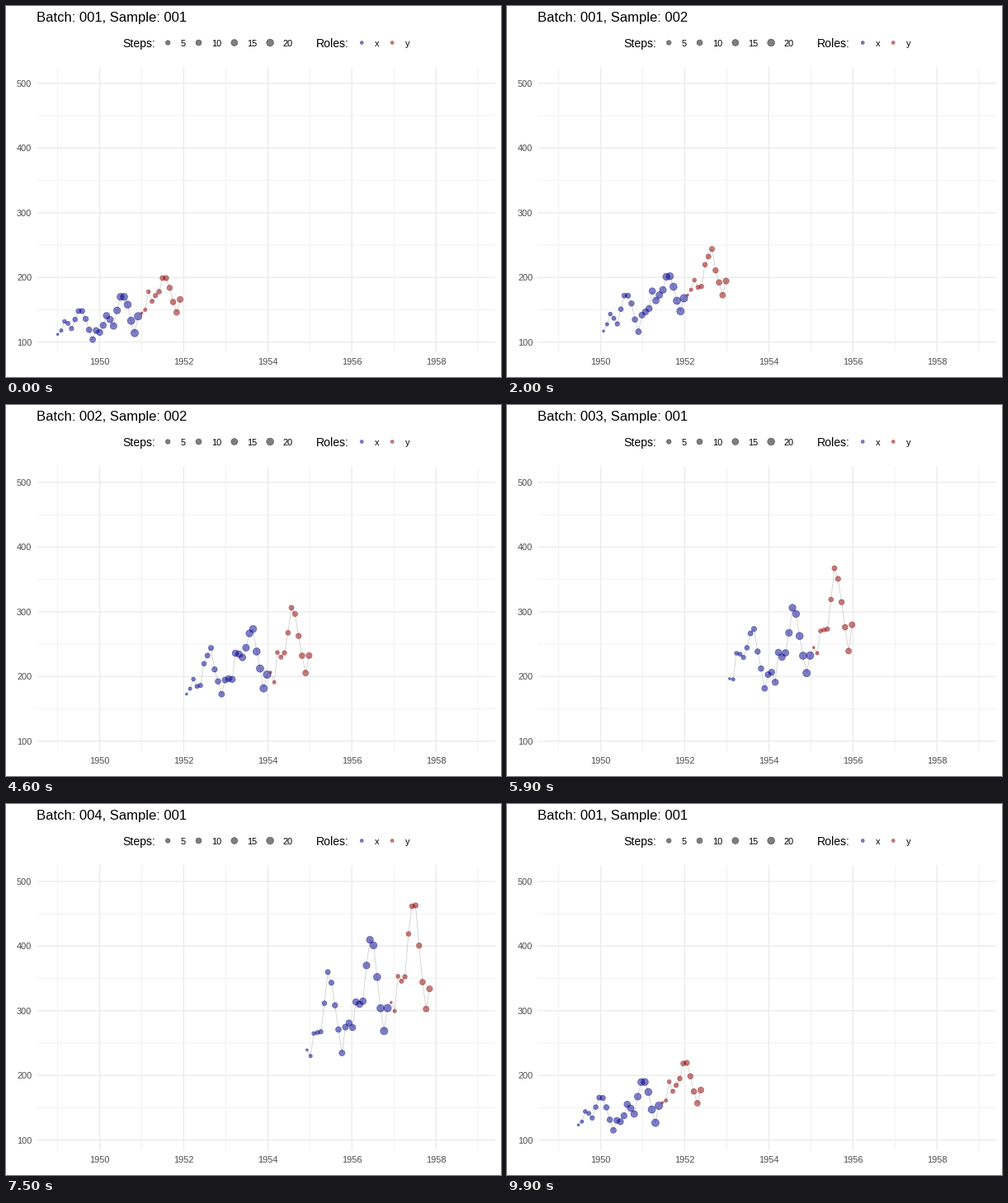
A matplotlib script that plays this animation: 600 by 450 pixels, repeating every 10 s.

```python
import numpy as np
import matplotlib.pyplot as plt
from matplotlib.animation import FuncAnimation

plt.rcParams["font.family"] = "Liberation Sans"

# Monthly airline passengers, 1949 to 1958
PASSENGERS = np.array([
    112, 118, 132, 129, 121, 135, 148, 148, 136, 119, 104, 118,
    115, 126, 141, 135, 125, 149, 170, 170, 158, 133, 114, 140,
    145, 150, 178, 163, 172, 178, 199, 199, 184, 162, 146, 166,
    171, 180, 193, 181, 183, 218, 230, 242, 209, 191, 172, 194,
    196, 196, 236, 235, 229, 243, 264, 272, 237, 211, 180, 201,
    204, 188, 235, 227, 234, 264, 302, 293, 259, 229, 203, 229,
    242, 233, 267, 269, 270, 315, 364, 347, 312, 274, 237, 278,
    284, 277, 317, 313, 318, 374, 413, 405, 355, 306, 271, 306,
    315, 301, 356, 348, 355, 422, 465, 467, 404, 347, 305, 336,
    340, 318, 362, 348, 363, 435, 491, 505, 404, 359, 310, 337])

W, H, DPI = 600, 450, 72          # at 72 dpi one point is one pixel
LEFT, RIGHT, TOP, BOTTOM = 37.4, 593, 74.2, 420.3
FRAMES, STEP_MS, TWEEN = 100, 100, 6
HOLD_ENDS = [6, 19, 32, 45, 58, 70, 82, 94]
STATES = len(HOLD_ENDS)
X_LEN, Y_LEN = 24, 12
BLACK, BLUE, RED = (0, 0, 0, .5), (0, 0, 139 / 255, .5), (139 / 255, 0, 0, .5)
STROKE = 0.709


def day(year, month=1):
    start = np.datetime64("1949-01-01")
    return (np.datetime64(f"{year}-{month:02d}-01") - start).astype(int)


DAYS = np.array([day(1949 + i // 12, i % 12 + 1) for i in range(len(PASSENGERS))])


def scale(v, data, lo, hi):
    """Map data to pixels with a 5 % margin on both sides."""
    a, b = data.min(), data.max()
    return lo + (hi - lo) * ((v - a) / (b - a) + 0.05) / 1.1


def px(d):
    return scale(d, DAYS, LEFT, RIGHT)


def py(v):
    return scale(v, PASSENGERS, BOTTOM, TOP)


def area(size):
    """Marker area for a point size given in millimetres."""
    return (0.75 * (size * 72.27 / 25.4 + 0.945)) ** 2


def step_size(step):
    return 1 + 3 * np.sqrt((np.asarray(step) - 1) / (X_LEN - 1))


fig = plt.figure(figsize=(W / DPI, H / DPI), dpi=DPI, facecolor="white")
ax = fig.add_axes([0, 0, 1, 1])
ax.set(xlim=(0, W), ylim=(H, 0))
ax.axis("off")


def label(x, y, text, size, ha="left", color="black"):
    return ax.text(x, y, text, fontsize=size, ha=ha, va="baseline", color=color)


def grid(xs, ys, lw):
    style = dict(color="#ebebeb", lw=lw, snap=False, solid_capstyle="butt", zorder=1)
    for x in xs:
        ax.plot([x, x], [TOP, BOTTOM], **style)
    for y in ys:
        ax.plot([LEFT, RIGHT], [y, y], **style)


def dots(x, y, sizes, colors, z):
    return ax.scatter(x, y, s=area(np.asarray(sizes)), facecolors=colors,
                      edgecolors=colors, linewidths=STROKE, zorder=z)


# Panel
years, levels = range(1950, 1960, 2), range(100, 600, 100)
grid([px(day(y)) for y in range(1949, 1960, 2)],
     [py(v) for v in range(150, 500, 100)], 0.68)
grid([px(day(y)) for y in years], [py(v) for v in levels], 1.36)
for y in years:
    label(px(day(y)), 435, str(y), 11, "center", "#4d4d4d")
for v in levels:
    label(31.3, py(v) + 4, str(v), 11, "right", "#4d4d4d")

# Legends
label(141, 50, "Steps:", 14)
label(376, 50, "Roles:", 14)
steps = [5, 10, 15, 20]
keys = [196.2, 233.5, 276.8, 320.1, 431.2, 468.2]
dots(keys, [44.5] * 6, [*step_size(steps), 1.5, 1.5], [BLACK] * 4 + [BLUE, RED], 3)
for x, text in zip(keys, [*map(str, steps), "x", "y"]):
    label(x + 15.6, 49, text, 11)

# Moving parts
title = label(37.4, 19, "", 16.6)
line, = ax.plot([], [], color="#bebebe", lw=0.6, snap=False, zorder=2)
order = [*range(1, X_LEN + 1), *range(1, Y_LEN + 1)]
series = dots(np.zeros(36), np.zeros(36), step_size(order),
              [BLUE] * X_LEN + [RED] * Y_LEN, 4)


def window(state):
    part = slice(12 * state, 12 * state + X_LEN + Y_LEN)
    return np.column_stack([px(DAYS[part]), py(PASSENGERS[part])])


def update(frame):
    state = sum(frame > end + TWEEN for end in HOLD_ENDS)
    t = max(0, frame - HOLD_ENDS[state]) / TWEEN
    following = (state + 1) % STATES
    ease = (1 - np.cos(np.pi * t)) / 2
    pts = (1 - ease) * window(state) + ease * window(following)
    series.set_offsets(pts)
    line.set_data(pts[:, 0], pts[:, 1])
    shown = state if t <= 0.5 else following
    title.set_text(f"Batch: {shown // 2 + 1:03d}, Sample: {shown % 2 + 1:03d}")
    return line, series, title


anim = FuncAnimation(fig, update, frames=FRAMES, interval=STEP_MS,
                     repeat=True, repeat_delay=0, blit=False)
plt.show()
```
